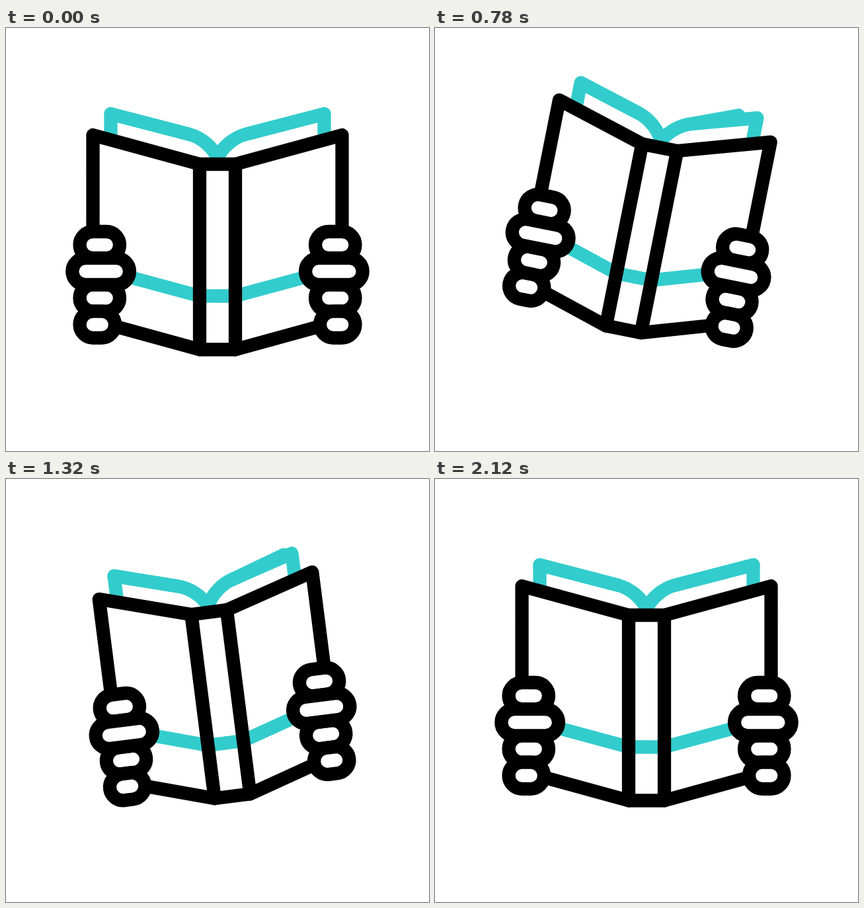
An HTML page with a canvas for the animation above (2.4 s loop, 640 px wide and 640 px high).

```html
<!DOCTYPE html>
<html>
<head>
<meta charset="utf-8">
<style>
html, body { margin: 0; width: 100%; height: 100%; overflow: hidden; background: #fff; }
canvas { display: block; width: 100vmin; height: 100vmin; }
</style>
</head>
<body>
<canvas id="stage" width="640" height="640"></canvas>
<script>
const ctx = document.getElementById('stage').getContext('2d');
const LOOP = 2400, STEP = 20, END = 2120;
const CENTER = 320, PIVOT = 308, FINGER = 40.2;
const BLACK = '#000', TEAL = '#33cccc';

const ease = u => (1 - Math.cos(Math.PI * Math.min(1, Math.max(0, u)))) / 2;

// Eases between turning points given as [ms, value].
function swing(turns, t) {
  let value = 0, from = 0;
  for (const [time, next] of [...turns, [END, 0]]) {
    if (t < time) return value + (next - value) * ease((t - from) / (time - from));
    [from, value] = [time, next];
  }
  return 0;
}

// After the first lean, each swing is half as wide as the one before.
const leans = [0, 1, 2].map(i => [890 + 400 * i, 14.8 * (-0.5) ** i]);
const tilt = t => swing([[370, -18.5], ...leans], t);
const drop = t => swing([[360, 50], [740, -31], [1040, 56], [1420, -17], [1700, 22.5], [1930, -6]], t);
const fold = t => ease((850 - Math.abs(t - END / 2)) / 650);

function line(color, ...points) {
  ctx.strokeStyle = color;
  ctx.beginPath();
  points.forEach(p => ctx.lineTo(...p));
  ctx.stroke();
}

function page(x, y) {
  ctx.strokeStyle = TEAL;
  ctx.beginPath();
  ctx.moveTo(158.5 + x, 161 + y);
  ctx.lineTo(158.5 + x, 130 + y);
  ctx.lineTo(278, 161);
  ctx.bezierCurveTo(296, 166, 312, 180, CENTER, 196);
  ctx.stroke();
}

function finger(row, left, right) {
  ctx.beginPath();
  ctx.roundRect(left, PIVOT + row * FINGER, right - left, FINGER, FINGER / 2);
  ctx.fill();
  ctx.strokeStyle = BLACK;
  ctx.stroke();
}

// One half of the book; x and y shift its outer edge, kink bends the page top.
function half(x, y, kink) {
  page(x, y);
  line(TEAL, [278, 161], [158.5 + x + kink, 130 + y + kink / 17]);
  line(TEAL, [180 + x, 375 + y], [293, 405.5], [CENTER, 405.5]);
  line(BLACK, [293, 206], [131.5 + x, 162 + y], [131.5 + x, PIVOT + y]);
  ctx.save();
  ctx.translate(x, y);
  finger(0, 111.5, 172);
  finger(2, 111.5, 172);
  finger(3, 111.5, 165);
  finger(1, 100.3, 187);
  ctx.restore();
  line(BLACK, [165.5 + x, 451.5 + y], [293, 486.5]);
}

function draw(t) {
  const k = fold(t), angle = tilt(t), x = 26.5 * k, y = 3.5 * k;
  ctx.setTransform(1, 0, 0, 1, 0, 0);
  ctx.fillStyle = '#fff';
  ctx.fillRect(0, 0, 640, 640);
  ctx.lineWidth = 20.3;
  ctx.lineCap = ctx.lineJoin = 'round';
  ctx.translate(CENTER, PIVOT + drop(t));
  ctx.rotate(angle * Math.PI / 180);
  ctx.translate(-CENTER, -PIVOT);
  half(x, y, 0);
  ctx.save();
  ctx.translate(2 * CENTER, 0);
  ctx.scale(-1, 1);
  half(x, y, k ** 3 * angle ** 2 / 4);
  ctx.restore();
  ctx.strokeStyle = BLACK;
  ctx.strokeRect(293, 206, 54, 280.5);
}

const start = performance.now();
function tick() {
  const t = (performance.now() - start) % LOOP;
  draw(Math.floor(t / STEP) * STEP);
  requestAnimationFrame(tick);
}
tick();
</script>
</body>
</html>
```
